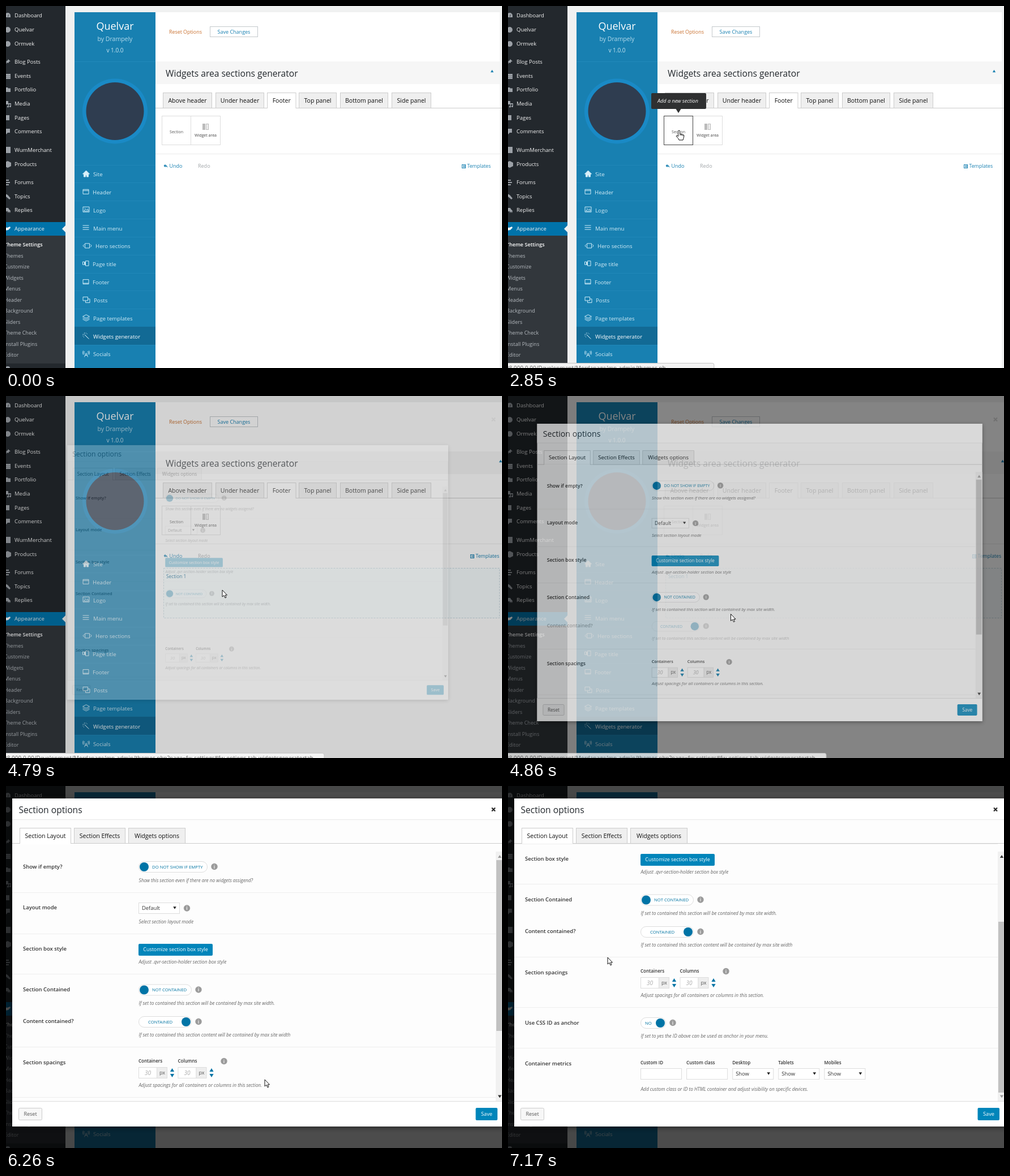
Recreate the animation shown at these times as an HTML page. Size 876x640 px, loop 8 s.

```html
<!DOCTYPE html>
<html lang="en">
<head>
<meta charset="utf-8">
<title>Widgets generator</title>
<style>
  html, body { margin: 0; width: 100%; height: 100%; overflow: hidden; background: #f0f1f1; }
  svg { display: block; width: 100%; height: 100%; font-family: "Open Sans", "Noto Sans", sans-serif; }
  text { white-space: pre; }
</style>
</head>
<body>
<svg id="stage" viewBox="0 0 876 640"></svg>
<script>
const BLUE = '#1880b1', LINK = '#0074a2', BUTTON = '#0085ba';

// y is the vertical middle of the line of text
const text = (x, y, label, size, fill, more = '') =>
  `<text x="${x}" y="${y + size * 0.36}" font-size="${size}" fill="${fill}" ${more}>${label}</text>`;
const rect = (x, y, w, h, fill, more = '') =>
  `<rect x="${x}" y="${y}" width="${w}" height="${h}" fill="${fill}" ${more}/>`;
const box = (x, y, w, h, fill, stroke, more = '') =>
  rect(x + 0.5, y + 0.5, w - 1, h - 1, fill, `stroke="${stroke}" ${more}`);
const circle = (x, y, r, fill) => `<circle cx="${x}" cy="${y}" r="${r}" fill="${fill}"/>`;
const path = (d, x, y, fill, more = '') =>
  `<path d="${d}" transform="translate(${x} ${y})" fill="${fill}" ${more}/>`;
const triangle = (x, y, r, dir, fill) => path(`M${-r} ${r * dir * 0.8}H${r}L0 ${-r * dir * 0.8}Z`, x, y, fill);
const group = (id, body, more = '') => `<g id="${id}" ${more}>${body}</g>`;
const BOLD = 'font-weight="600"', ITALIC = 'font-style="italic"', MIDDLE = 'text-anchor="middle"';

const tabs = (list, active, y, right) => {
  const tab = ([x, w, label], i) => {
    const on = i === active;
    return box(x, y, w, 28, on ? '#fff' : '#efefef', '#ccc') +
      (on ? rect(x + 1, y + 27, w - 2, 2, '#fff') : '') +
      text(x + w / 2, y + 14, label, 10.55, '#111', MIDDLE);
  };
  return rect(right[0], y + 27, right[1], 1, '#ccc') + list.map(tab).join('');
};

function adminMenu() {
  const icons = {
    gauge: 'M-5 0a5 5 0 0110 0v3H-5zM0 1l2-4-1 5z',
    pin: 'M1-5l4 4-2 0-2 3-2-1-4 4 3-5-1-1 3-2z',
    calendar: 'M-5-4H5V5H-5zM-3-1v1h1v-1zM0-1v1h1v-1zM3-1v1h1v-1zM-3 2v1h1V2zM0 2v1h1V2zM3 2v1h1V2z',
    folder: 'M-5-4H0l1 1.500H5V4H-5z',
    media: 'M-5-5H1V1H-5zM1-1H6V4.500a1.500 1.500 0 11-1-1.500V1H2V5a1.500 1.500 0 11-1-1.500z',
    page: 'M-4-5H3V4H-4z',
    speech: 'M-5-5H4V2H0l-3 3V2H-5z',
    cube: 'M0-6L6-3V3L0 6-6 3V-3z',
    bars: 'M-3-5H2V-3H-3zM-5-1H4V1H-5zM-3 3H2V5H-3z',
    wrench: 'M-4-5L0-3 5 3 3 5-3 0-5-3z',
    people: 'M-4-4H1L2-2 5 1 4 5 2 2 1 5-1 1-4 4z',
    brush: 'M-5-3l4 1 5-2 1 2-4 4-5 1-1-3z'
  };
  const items = [
    ['Dashboard', 17, 'gauge'], ['Quelvar', 42, 'dot'], ['Ormvek', 67, 'dot'], ['Blog Posts', 99, 'pin'],
    ['Events', 124, 'calendar'], ['Portfolio', 148, 'folder'], ['Media', 173, 'media'], ['Pages', 198, 'page'],
    ['Comments', 222, 'speech'], ['WumMerchant', 255, 'square'], ['Products', 280, 'cube'], ['Forums', 312, 'bars'],
    ['Topics', 337, 'wrench'], ['Replies', 361, 'people'], ['Appearance', 394, 'brush']
  ];
  const subs = ['Theme Settings', 'Themes', 'Customize', 'Widgets', 'Menus', 'Header', 'Background',
    'Sliders', 'Theme Check', 'Install Plugins', 'Editor'];
  const icon = (name, y, fill) =>
    name === 'dot' ? circle(3, y, 5, fill) :
    name === 'square' ? rect(-3, y - 6, 11, 11, fill) : path(icons[name], 3, y, fill, 'fill-rule="evenodd"');
  return rect(0, 0, 105, 640, '#23282d') + rect(0, 382, 105, 24, '#0073aa') +
    path('M0-6V6L-6 0Z', 105, 394, '#f0f1f1') + rect(0, 406, 105, 226, '#32373c') +
    items.map(([label, y, name]) =>
      icon(name, y, y === 394 ? '#fff' : '#9ca1a7') + text(15, y, label, 9.5, '#f2f2f2')).join('') +
    subs.map((label, i) => i
      ? text(-3, 421.7 + i * 19.55, label, 9.1, '#b4b9be')
      : text(-3, 421.7, label, 9.1, '#fff', BOLD)).join('') +
    path('M-4 2a4 3 0 018 0z', 3, 638, '#9ca1a7');
}

function themePanel() {
  const items = [
    ['Site', 154, 'M0 6L6 0 12 6H10V11H7V8H5V11H2V6Z', 1], ['Header', 153, 'M.5 1.500H10.500V9.500H.5ZM.5 3.500H10.500'],
    ['Logo', 154, 'M.5.5H11.500V9.500H.5ZM2 8l3-4 2 2 2-2 1 4zM3 3h1'], ['Main menu', 154, 'M0 1.500H11M0 5H11M0 8.500H11'],
    ['Hero sections', 158, 'M4 1.500H12V9.500H4ZM2.500 3L.5 5.500l2 2.500M13.500 3l2 2.500-2 2.500'],
    ['Page title', 153, 'M0 2H3V7H0ZM5 .5H10.500V9H5ZM4 2V8'], ['Footer', 153, 'M.5 1.500H10.500V9.500H.5ZM.5 8H10.500'],
    ['Posts', 155, 'M.5.5H9V7H.5ZM9 4H12.500V10.500H5V7'],
    ['Page templates', 154, 'M0 3L6 0 12 3 6 6ZM0 5.500L6 8.500 12 5.500M0 8L6 11 12 8'],
    ['Widgets generator', 154, 'M3 3L11 11M4 4L10 10M3 0V1.500M0 3H1.500M6 0L5 1M0 6L1 5M7 2h1M2 7v1'],
    ['Socials', 154, 'M6 4L3 11M6 4L9 11M4 8H8M3 1Q1 4 3 6M9 1Q11 4 9 6M1 0Q-1 4 1 7M11 0Q13 4 11 7']
  ];
  return rect(121, 11, 143, 629, BLUE) + rect(121, 98, 143, 1, '#2189bb') +
    text(192.5, 36, 'Quelvar', 18, '#fff', MIDDLE) +
    text(192.5, 58, 'by Drampely', 10.5, '#b5dbed', MIDDLE) +
    text(192.5, 78, 'v 1.0.0', 10, '#c9e5f2', MIDDLE) +
    circle(192.5, 186, 57.5, '#1a8ac6') + circle(192.5, 186, 51, '#2f3d50') +
    items.map(([label, x, icon, solid], i) => {
      const y = 297.5 + i * 31.85, on = i === 9;
      return rect(121, Math.round(y - 17), 143, on ? 32 : 1, on ? '#126a95' : '#2087b8') +
        path(icon, 135.5, y - 6.5, solid ? '#d9eff9' : 'none', 'stroke="#cdeaf7" stroke-width="1"') +
        text(x, y, label, 9.7, on ? '#fff' : '#d3ebf6');
    }).join('');
}

function workspace() {
  const arrow = 'M0 3L3 0V2Q7 2 6.500 7 6 4 3 4V6Z';
  return rect(264, 11, 608, 629, '#fff', 'id="sheet"') + rect(264, 98, 608, 40, '#f6f6f6', 'id="band"') +
    text(288, 46, 'Reset Options', 8.9, '#c9702f') +
    box(360, 36, 85, 19, '#fff', '#c4c9cc') + text(402.500, 46, 'Save Changes', 9, BLUE, MIDDLE) +
    text(282, 119, 'Widgets area sections generator', 15.6, '#23282d') +
    tabs([[277, 87, 'Above header'], [370, 86, 'Under header'], [461, 51.5, 'Footer'], [517, 67, 'Top panel'],
      [590, 85, 'Bottom panel'], [681, 70, 'Side panel']], 2, 153, [264, 612]) +
    box(275, 194, 52, 52, '#fff', '#ddd') + box(326, 194, 53, 52, '#fff', '#ddd') +
    box(275, 194, 52, 52, '#fff', '#444', 'id="hover"') +
    text(301, 222, 'Section', 7, '#555', MIDDLE) + text(352.5, 228, 'Widget area', 7, '#444', MIDDLE) +
    rect(347, 208, 5, 11, '#bbb') + box(353, 208, 5, 11, '#eee', '#bbb') +
    rect(264, 261, 612, 1, '#ebebeb') +
    path(arrow, 278.5, 279.5, BLUE) + text(288.5, 283, 'Undo', 9, BLUE) +
    path(arrow, 336, 279.5, '#aaa', 'style="scale:-1 1"') + text(339, 283, 'Redo', 9, '#a0a5a8') +
    group('right', triangle(858.5, 115, 2.7, 1, BLUE) + box(805, 280, 7, 7, '#fff', BLUE) +
      rect(807, 282, 5, 1, BLUE) + rect(807, 284, 5, 1, BLUE) + text(814.500, 283, 'Templates', 8.7, BLUE)) +
    group('section', box(278, 304, 579, 89, '#f8fdff', '#c5d8e0', 'id="sectionBox" stroke-dasharray="3 2"') +
      text(283, 319, 'Section 1', 8.3, '#1b6f96')) +
    group('tooltip', rect(253, 154, 97, 28, '#2f3031', 'rx="2"') + triangle(301, 184.4, 6, -1, '#2f3031') +
      text(264, 168, 'Add a new section', 9.1, '#fff', ITALIC));
}

function optionRows() {
  const label = (y, s) => text(30, y, s, 9.5, '#333', BOLD);
  const note = (y, s) => text(234.5, y, s, 8.3, '#666', ITALIC);
  const head = (x, y, s) => text(x, y, s, 8, '#333', BOLD);
  const rule = y => rect(11, y, 854, 1, '#eee');
  const info = (x, y) => circle(x, y, 5.7, '#9b9b9b') + text(x, y, 'i', 8.5, '#fff', MIDDLE + ' ' + BOLD);
  const toggle = (y, w, s, on) => box(234, y - 10, w, 20, '#fff', '#ddd', 'rx="9.5"') +
    circle(on ? 224 + w : 244, y, 8, '#0074a6') + text(on ? (w < 60 ? 242 : 251) : 258, y, s, 7.75, LINK) +
    info(234 + w + 12, y - 0.5);
  const select = (x, y, s) => box(x, y, 73, 20, '#fff', '#ddd') + text(x + 6, y + 10, s, 9.4, '#333') +
    triangle(x + 64, y + 9.5, 2.8, -1, '#222');
  const spacing = x => box(x, 497, 33, 20, '#fff', '#ddd') + box(x + 32, 497, 19, 20, '#eee', '#ddd') +
    text(x + 11, 507, '30', 10, '#aaa', ITALIC) + text(x + 37, 506.5, 'px', 9, '#555') +
    triangle(x + 59.5, 502, 3.6, 1, '#0074a6') + triangle(x + 59.5, 512, 3.6, -1, '#0074a6');

  return label(143, 'Show if empty?') + toggle(143, 122, 'DO NOT SHOW IF EMPTY') +
    note(167, 'Show this section even if there are no widgets assigend?') + rule(188) +
    label(215, 'Layout mode') + select(234, 206, 'Default') + info(319.5, 216) +
    note(240, 'Select section layout mode') + rule(261) +
    label(288, 'Section box style') + rect(234, 279, 131, 21, BUTTON, 'rx="2"') +
    text(299.5, 289, 'Customize section box style', 8.9, '#fff', MIDDLE) +
    note(311, 'Adjust .qvr-section-holder section box style') + rule(332) +
    label(360, 'Section Contained') + toggle(360.5, 94, 'NOT CONTAINED') +
    note(384, 'If set to contained this section will be contained by max site width.') +
    group('lateRow', label(416, 'Content contained?') + toggle(417, 94, 'CONTAINED', true) +
      note(440, 'If set to contained this section content will be contained by max site width')) + rule(461) +
    label(489, 'Section spacings') + head(234, 486, 'Containers') + head(303.5, 486, 'Columns') + info(385, 486.5) +
    spacing(234) + spacing(303.5) + note(529, 'Adjust spacings for all containers or columns in this section.') + rule(550) +
    label(578, 'Use CSS ID as anchor') + toggle(578, 45, 'NO', true) +
    note(601, 'If set to yes the ID above can be used as anchor in your menu.') + rule(622) +
    label(650, 'Container metrics') +
    ['Custom ID', 'Custom class', 'Desktop', 'Tablets', 'Mobiles'].map((s, i) => {
      const x = 234 + i * 81.1;
      return head(x, 648, s) + (i < 2 ? box(x, 658, 73, 20, '#fff', '#ddd') : select(x, 658, 'Show'));
    }).join('') +
    note(695, 'Add custom class or ID to HTML container and adjust visibility on specific devices.');
}

function dialog() {
  return rect(11, 22, 867, 580, '#fdfdfd', 'style="filter:drop-shadow(0 2px 4px #0008)"') +
    rect(11, 22, 867, 37, '#fff') + rect(11, 59, 867, 1, '#e8e8e8') +
    text(22.5, 42, 'Section options', 15.6, '#23282d') +
    tabs([[24, 91, 'Section Layout'], [120, 91, 'Section Effects'], [216, 101, 'Widgets options']], 0, 74, [11, 867]) +
    `<g clip-path="url(#rowsClip)">${group('rows', optionRows())}</g>` +
    rect(865, 116, 13, 441, '#f1f1f1') + rect(866, 131, 11, 302, '#c1c1c1', 'id="thumb"') +
    group('upArrow', triangle(872, 124.5, 3.2, 1, '#333')) + group('downArrow', triangle(872, 549, 3.2, -1, '#333')) +
    rect(11, 557, 867, 45, '#fff') + rect(11, 557, 867, 1, '#ddd') +
    box(22, 569, 42, 22, '#f7f7f7', '#ccc', 'rx="2"') + text(43, 580, 'Reset', 9, '#555', MIDDLE) +
    rect(829.5, 569, 38.5, 22, BUTTON, 'rx="2"') + text(849, 580, 'Save', 9.2, '#fff', MIDDLE);
}

const ADDRESS = '08.000.0.00/Development/Mordapage/mp-admin/themes.php?page=fw-settings#fw-options-tab-widgetsgeneratortab';
const outline = 'stroke="#111" stroke-width="1" stroke-linejoin="round"';

document.getElementById('stage').innerHTML =
  '<clipPath id="rowsClip"><rect x="11" y="102" width="854" height="455"/></clipPath>' +
  rect(0, 0, 876, 640, '#f0f1f1') + adminMenu() + themePanel() + workspace() +
  rect(0, 0, 876, 640, '#000', 'id="shade"') +
  group('status', rect(-5, 631.5, 10, 20, '#f3f3f3', 'id="statusBar" rx="3" stroke="#c4c4c4"') +
    text(-4, 640, '', 10, '#666', 'id="statusText"')) +
  group('dialog', dialog()) +
  path('M-3-3L3 3M3-3L-3 3', 861, 41.5, 'none', 'id="close" stroke="#222" stroke-width="2"') +
  group('arrow', path('M0 0V12L3 9.500 5 14 7 13 5 9H8.500Z', 0, 0, '#fff', outline)) +
  group('hand', path('M-1.500 1.500a1.500 1.500 0 013 0V6l6 1.500a2 2 0 011.500 2L8 13.500 7 17H0L-1 14.500-5 10-3.700 8.700-1.500 10.500ZM2 6V9M4.500 7V9M7 8V10',
    0, 0, '#fff', outline));

const el = {};
document.querySelectorAll('#stage [id]').forEach(node => { el[node.id] = node; });

const ramp = (t, from, to) => Math.min(1, Math.max(0, (t - from) / (to - from)));
const smooth = p => p * p * (3 - 2 * p);
const easeOut = p => 1 - (1 - p) ** 2;

// time, x, y of the pointer's hot spot
const POINTER = [
  [308, 676, 586], [462, 524, 497], [760, 524, 497], [790, 523, 497], [980, 523, 497], [1694, 303, 220],
  [2370, 303, 220], [2390, 302, 220], [3420, 302, 220], [3620, 328, 228], [3830, 328, 228],
  [4004, 354, 320], [4158, 379, 334], [4380, 379, 334], [4400, 381, 335], [4540, 381, 335],
  [4620, 382, 343], [4774, 382, 343], [4928, 405, 428], [5313, 457, 519],
  [6237, 457, 519], [6390, 440, 545], [6800, 176, 303]
];
function pointerAt(t) {
  const next = POINTER.findIndex(p => p[0] > t);
  if (next < 1) return POINTER[next ? POINTER.length - 1 : 0].slice(1);
  const [a, b] = [POINTER[next - 1], POINTER[next]];
  const p = ramp(t, a[0], b[0]);
  return [a[1] + (b[1] - a[1]) * p, a[2] + (b[2] - a[2]) * p];
}

const fade = (node, value) => node.setAttribute('opacity', value);

function draw(t) {
  const opening = smooth(ramp(t, 4690, 4946));
  const widened = t > 4690;

  // adding a section
  fade(el.hover, t < 1500 ? 0 : 1 - ramp(t, 3850, 4200));
  fade(el.tooltip, ramp(t, 1463, 1694) * (1 - ramp(t, 3850, 4050)));
  fade(el.section, t > 3070 ? 1 : 0);

  // the page loses its scrollbar while the dialog is open
  el.right.setAttribute('transform', `translate(${widened ? 15 : 0} 0)`);
  el.sheet.setAttribute('width', widened ? 612 : 608);
  el.band.setAttribute('width', widened ? 612 : 608);
  el.sectionBox.setAttribute('width', widened ? 593 : 578);

  const grown = ramp(t, 2772, 3040);
  el.statusBar.setAttribute('width', 289 + 278 * grown);
  el.statusText.textContent = grown < 1 ? ADDRESS.slice(0, 52) : ADDRESS;
  fade(el.status, t < 1500 ? 0 : 1 - ramp(t, 4820, 4980));

  // dialog
  const scale = 0.7 + 0.3 * opening;
  fade(el.shade, 0.7 * opening);
  fade(el.dialog, opening);
  el.dialog.setAttribute('transform', `translate(444.6 311.5) scale(${scale}) translate(-444.6 -311.5)`);
  fade(el.lateRow, ramp(t, 4774, 4967));
  fade(el.close, ramp(t, 4740, 5300));

  const scrolled = easeOut(ramp(t, 6620, 7161));
  el.rows.setAttribute('transform', `translate(0 ${-159 * scrolled})`);
  el.thumb.setAttribute('y', 131 + 109 * scrolled);
  fade(el.upArrow, scrolled > 0 ? 1 : 0.45);
  fade(el.downArrow, scrolled < 1 ? 1 : 0.45);

  // pointer
  const [x, y] = pointerAt(t);
  const linked = t > 1500 && t < 4690;
  for (const node of [el.arrow, el.hand]) node.setAttribute('transform', `translate(${x} ${y})`);
  fade(el.arrow, t > 300 && !linked ? 1 : 0);
  fade(el.hand, linked ? 1 : 0);
}

const LOOP = 8000, STEP = 77;
const start = performance.now();
function tick() {
  const t = (performance.now() - start) % LOOP;
  draw(Math.floor((t + 18) / STEP) * STEP);
  requestAnimationFrame(tick);
}
tick();
</script>
</body>
</html>
```
